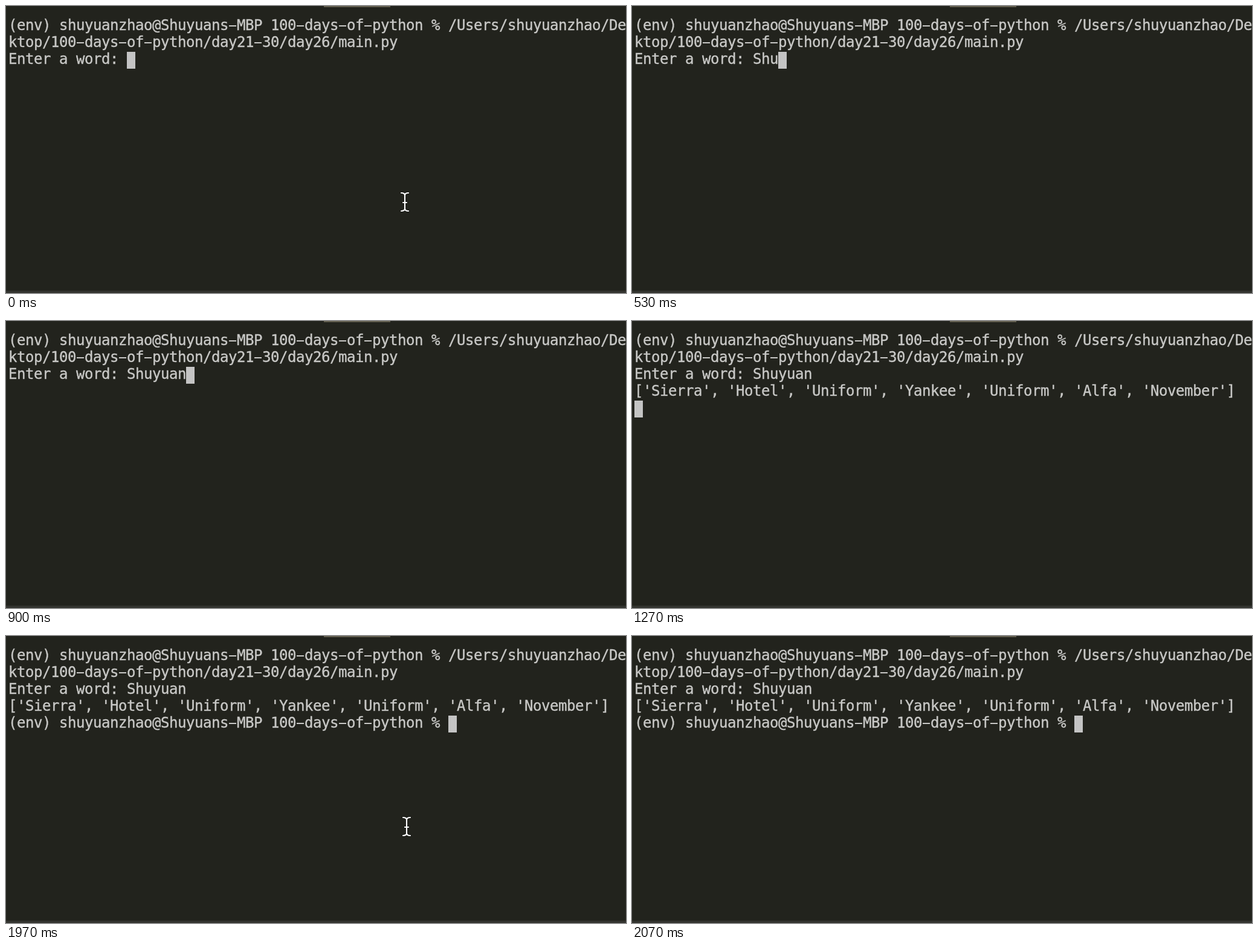
An HTML page with a canvas that plays this animation: 1026 by 476 pixels, repeating every 2.71 s.

```html
<!DOCTYPE html>
<html lang="en">
<head>
<meta charset="utf-8">
<style>
  html, body { margin: 0; width: 100%; height: 100%; overflow: hidden; background: #22231d; }
  canvas { display: block; }
</style>
</head>
<body>
<canvas id="stage" width="1026" height="476"></canvas>
<script>
const ctx = document.getElementById('stage').getContext('2d');
const LOOP = 2710, CELL = 14, LINE = 28, LEFT = 4, TOP = 20;
const WORD = 'Shuyuan';
const KEY_TIMES = [30, 300, 530, 700, 770, 830, 900];
const OUTPUT_AT = 1270, PROMPT_AT = 1300, POINTER_AT = 1970, POINTER_GONE = 2070;
const PROMPT = '(env) shuyuanzhao@Shuyuans-MBP 100-days-of-python % ';
const COMMAND = [PROMPT + '/Users/shuyuanzhao/De', 'ktop/100-days-of-python/day21-30/day26/main.py'];
const CODES = ['Sierra', 'Hotel', 'Uniform', 'Yankee', 'Uniform', 'Alfa', 'November'];
const OUTPUT = '[' + CODES.map(code => `'${code}'`).join(', ') + ']';

function rect(color, x, y, w, h) {
  ctx.fillStyle = color;
  ctx.fillRect(x, y, w, h);
}

function drawLine(text, row) {
  const baseline = TOP + row * LINE + 20;
  [...text].forEach((char, i) => {
    const x = LEFT + i * CELL;
    // The terminal face has a wide, thin hyphen.
    if (char === '-') {
      ctx.fillRect(x + 1, baseline - 8, 12, 2);
    } else {
      ctx.fillText(char, x, baseline);
      ctx.strokeText(char, x, baseline);
    }
  });
}

function drawPointer(x, y) {
  const beam = new Path2D('M-6-15Q0-15 0-11Q0-15 6-15M0-11V11M-6 15Q0 15 0 11Q0 15 6 15M-3 1H3');
  ctx.save();
  ctx.translate(x, y);
  ctx.lineCap = 'round';
  for (const [color, width] of [['#11120f', 3.6], ['#fff', 2.2]]) {
    ctx.strokeStyle = color;
    ctx.lineWidth = width;
    ctx.stroke(beam);
  }
  ctx.restore();
}

function draw(t) {
  const typed = KEY_TIMES.filter(time => time <= t).length;
  const lines = [...COMMAND, 'Enter a word: ' + WORD.slice(0, typed)];
  if (t >= OUTPUT_AT) lines.push(OUTPUT, t >= PROMPT_AT ? PROMPT : '');

  rect('#22231d', 0, 0, 1026, 476);
  rect('#625e4e', 526, 0, 110, 2);
  rect('#33342f', 0, 472, 1026, 4);

  ctx.font = '24px "DejaVu Sans Mono", monospace';
  ctx.fillStyle = ctx.strokeStyle = '#c8c8c6';
  ctx.lineWidth = 0.4;
  lines.forEach(drawLine);

  const row = lines.length - 1;
  rect('#c4c4c4', LEFT + lines[row].length * CELL, TOP + row * LINE, CELL, LINE);

  if (t < KEY_TIMES[0]) drawPointer(660, 325);
  if (t >= POINTER_AT && t < POINTER_GONE) {
    const step = Math.floor((t - POINTER_AT) / 33.4);
    drawPointer(663 + step * 100, 316 - step * 150);
  }
}

function tick() {
  draw(performance.now() % LOOP);
  requestAnimationFrame(tick);
}
tick();
</script>
</body>
</html>
```
